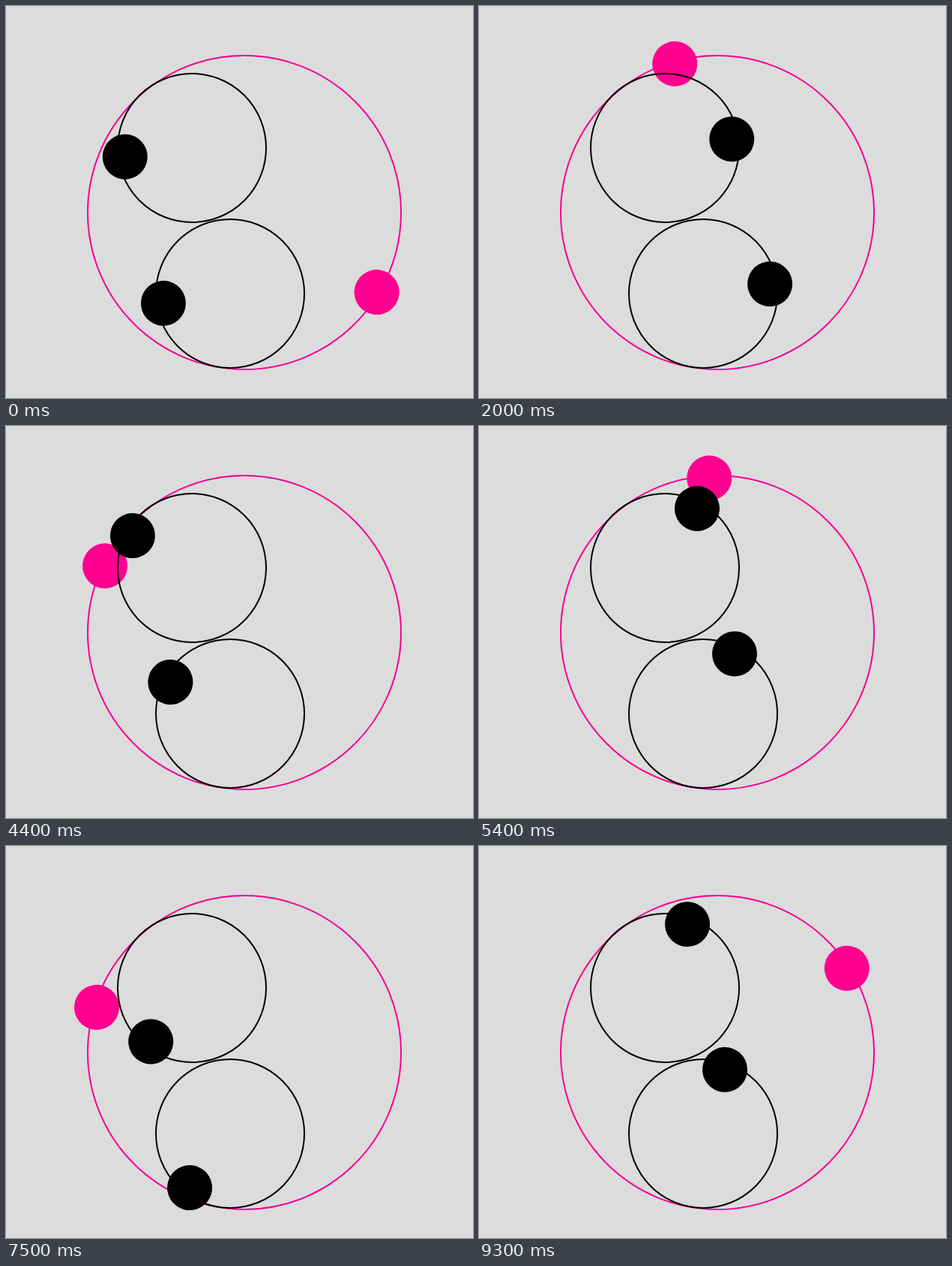
An HTML page that plays this animation: 623 by 522 pixels, repeating every 9400 ms.

```html
<!DOCTYPE html>
<html lang="en">
<head>
<meta charset="utf-8">
<title>Orbits</title>
<style>
  html, body { margin: 0; width: 100%; height: 100%; overflow: hidden; background: #dcdcdc; }
  svg { display: block; width: 623px; height: 522px; }
  .ring { fill: none; stroke-width: 2; }
  .pink .ring { stroke: #f50096; }
  .pink .dot { fill: #ff0090; }
  .black .ring { stroke: #000; }
</style>
</head>
<body>
<svg viewBox="0 0 623 522">
  <g class="pink" transform="translate(318 275)">
    <circle class="ring" r="209"/>
    <circle class="dot" id="outer" r="30" cx="206"/>
  </g>
  <g class="black" transform="translate(248 189)">
    <circle class="ring" r="99"/>
    <circle class="dot" id="upper" r="30" cx="90"/>
  </g>
  <g class="black" transform="translate(299 383)">
    <circle class="ring" r="99"/>
    <circle class="dot" id="lower" r="30" cx="90"/>
  </g>
</svg>
<script>
  const LOOP = 9.4, RATE = 10;

  // The outer dot surges and stalls between these [seconds, degrees]
  const surges = [
    [0, 31], [1, 122], [2, 254], [3.4, 504], [5.4, 627],
    [6, 738], [6.7, 835], [7, 841], [7.5, 917], [9.3, 1047]
  ];

  const [outer, upper, lower] = ['outer', 'upper', 'lower'].map(id => document.getElementById(id));
  const turn = (dot, degrees) => dot.setAttribute('transform', `rotate(${degrees.toFixed(2)})`);

  function surge(t) {
    const i = Math.max(1, surges.findIndex(([s]) => s >= t));
    const [t0, a0] = surges[i - 1], [t1, a1] = surges[i];
    return a0 + (a1 - a0) * (t - t0) / (t1 - t0);
  }

  function draw(seconds) {
    const t = Math.floor(seconds % LOOP * RATE) / RATE;
    const steady = 172.5 + 90 * t;
    turn(outer, surge(t));
    turn(upper, steady);
    turn(lower, steady - 0.7);
  }

  const start = performance.now();
  function tick() {
    draw((performance.now() - start) / 1000);
    requestAnimationFrame(tick);
  }
  tick();
</script>
</body>
</html>
```
